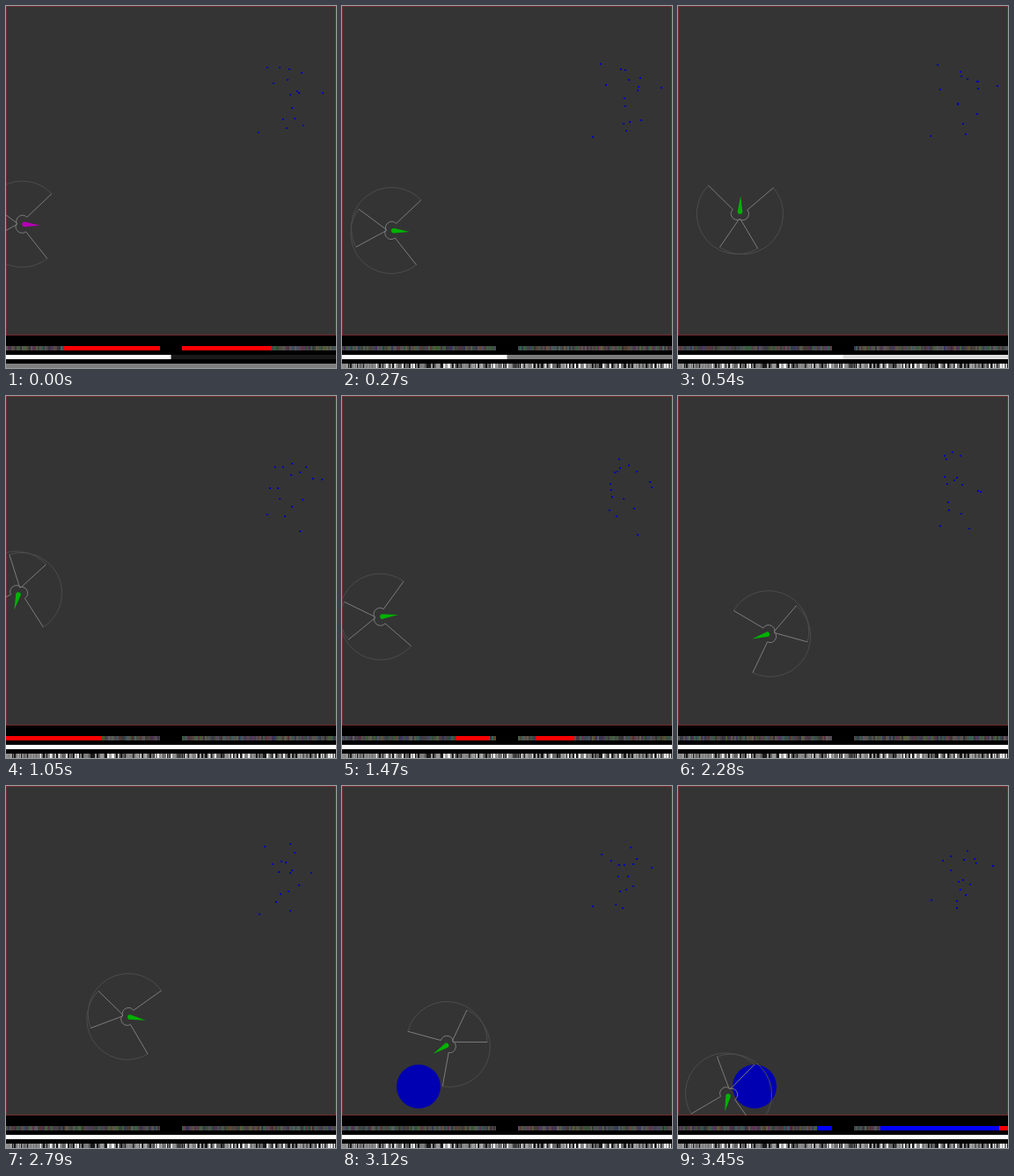
An HTML page with a canvas for the animation above (3.48 s loop, 375 by 412 pixels).

```html
<!DOCTYPE html>
<html>
<head>
<meta charset="utf-8">
<style>
html, body { margin: 0; width: 100%; height: 100%; overflow: hidden; background: #000; }
canvas { display: block; }
</style>
</head>
<body>
<canvas id="stage" width="375" height="412"></canvas>
<script>
const ctx = document.getElementById('stage').getContext('2d');
const LOOP = 3480, STEP = 30, WORLD = 375;
const RAD = Math.PI / 180, SPEED = 0.2;
const EYE = { offset: 4, turn: 130 * RAD, half: 82.5 * RAD, near: 7, far: 46, rays: 175 };
const FOOD = { x: 87, y: 342, r: 25, from: 3120 };
const SWARM = { count: 16, x: 318, y: 110, spreadX: 44, spreadY: 42, right: 364, top: 62 };
const BLUE = '#0000b2', BLUE_SEEN = '#0000ff', RED = '#ff0000';

// Agent waypoints: time, x, y, heading in degrees
const route = [
  [0, 21, 248.5, 4], [540, 70.5, 234, -88], [1050, 14, 226, 105],
  [1890, 57.5, 263.5, 138], [2280, 101.3, 271.3, 163],
  [2790, 141, 263, 12], [3450, 57, 353, 102]
];

function random(seed) {
  let s = seed | 0;
  return () => {
    s = (s + 0x6D2B79F5) | 0;
    let n = Math.imul(s ^ (s >>> 15), 1 | s);
    n ^= n + Math.imul(n ^ (n >>> 7), 61 | n);
    return ((n ^ (n >>> 14)) >>> 0) / 4294967296;
  };
}

const clamp = (v, lo, hi) => Math.max(lo, Math.min(hi, v));
const grey = v => `rgb(${v | 0},${v | 0},${v | 0})`;

// The agent always drives along its heading
function agentAt(t) {
  const next = route.findIndex((p, i) => i && t <= p[0]);
  const a = route[next - 1], b = route[next];
  const span = b[0] - a[0], u = (t - a[0]) / span;
  const axis = (i, fn) => {
    const p = a[i], q = b[i];
    const m = SPEED * span * fn(a[3] * RAD), n = SPEED * span * fn(b[3] * RAD);
    const c = 3 * (q - p) - 2 * m - n, d = 2 * (p - q) + m + n;
    return [p + u * (m + u * (c + u * d)), m + u * (2 * c + 3 * u * d)];
  };
  const [x, vx] = axis(1, Math.cos), [y, vy] = axis(2, Math.sin);
  return { x: clamp(x, 5, WORLD - 5), y: clamp(y, 5, WORLD - 5), heading: Math.atan2(vy, vx) };
}

function eyeOf(agent, side) {
  const dir = agent.heading + side * EYE.turn;
  return {
    x: agent.x + EYE.offset * Math.cos(dir),
    y: agent.y + EYE.offset * Math.sin(dir),
    from: dir - EYE.half, to: dir + EYE.half
  };
}

function drawEye(eye) {
  const arc = (r, color) => {
    ctx.strokeStyle = color;
    ctx.beginPath();
    ctx.arc(eye.x, eye.y, r, eye.from, eye.to);
    ctx.stroke();
  };
  arc(EYE.far, '#4c4c4c');
  arc(EYE.near, '#7c7c7c');
  ctx.beginPath();
  for (const angle of [eye.from, eye.to]) {
    const c = Math.cos(angle), s = Math.sin(angle);
    ctx.moveTo(eye.x + EYE.near * c, eye.y + EYE.near * s);
    ctx.lineTo(eye.x + EYE.far * c, eye.y + EYE.far * s);
  }
  ctx.stroke();
}

function drawBody(agent, color) {
  ctx.save();
  ctx.translate(agent.x, agent.y);
  ctx.rotate(agent.heading);
  ctx.fillStyle = color;
  ctx.beginPath();
  ctx.arc(0, 0, 2.8, 75 * RAD, 285 * RAD);
  ctx.lineTo(18, 0);
  ctx.fill();
  ctx.restore();
}

// Colour hit by a ray, or null when nothing is in range
function look(eye, angle, foodVisible) {
  const c = Math.cos(angle), s = Math.sin(angle);
  const wall = Math.min(
    c > 0 ? (WORLD - eye.x) / c : -eye.x / c,
    s > 0 ? (WORLD - eye.y) / s : -eye.y / s);
  let food = Infinity;
  if (foodVisible) {
    const dx = FOOD.x - eye.x, dy = FOOD.y - eye.y;
    const along = dx * c + dy * s;
    const root = FOOD.r ** 2 - (dx * dx + dy * dy - along * along);
    if (root >= 0 && along > 0) food = along - Math.sqrt(root);
  }
  if (Math.min(wall, food) > EYE.far) return null;
  return food < wall ? BLUE_SEEN : RED;
}

function drawRetina(eye, left, foodVisible, rnd) {
  const noise = () => 48 + rnd() * 50 | 0;
  let blank;
  for (let i = 0; i < EYE.rays; i++) {
    const angle = eye.from + (eye.to - eye.from) * i / EYE.rays;
    if (i % 2 === 0) blank = `rgb(${noise()},${noise()},${noise()})`;
    ctx.fillStyle = look(eye, angle, foodVisible) || blank;
    ctx.fillRect(left + i, 387, 1, 5);
  }
}

function drawMotors(t) {
  ctx.fillStyle = grey(255 * clamp(0.1 + t / 700, 0, 1));
  ctx.fillRect(0, 397, WORLD, 5);
  ctx.fillStyle = '#fff';
  ctx.fillRect(0, 397, WORLD / 2, 5);
}

// Cells settle from even grey into a fixed pattern of mid greys with a few extremes
function drawNeurons(t) {
  const rnd = random(11), gain = Math.min(1, t / 240);
  for (let x = 0; x < WORLD;) {
    const width = rnd() < 0.5 ? 1 : 2, kind = rnd();
    const value = kind < 0.22 ? 0.1 : kind > 0.86 ? 0.95 : 0.35 + rnd() * 0.35;
    ctx.fillStyle = grey(255 * (0.5 + (value - 0.5) * gain));
    ctx.fillRect(x, 407, width, 5);
    x += width;
  }
}

// Each dot drifts slowly around its own place in the cluster
function drawSwarm(t) {
  const rnd = random(5);
  const drift = () => 10 * Math.sin(t / (300 + 500 * rnd()) + 2 * Math.PI * rnd());
  ctx.fillStyle = BLUE;
  for (let i = 0; i < SWARM.count; i++) {
    const angle = 2 * Math.PI * rnd(), r = Math.sqrt(rnd());
    const x = SWARM.x + SWARM.spreadX * r * Math.cos(angle) + drift();
    const y = SWARM.y + SWARM.spreadY * r * Math.sin(angle) + drift();
    ctx.fillRect(Math.round(Math.min(x, SWARM.right)) - 1,
      Math.round(Math.max(y, SWARM.top)) - 1, 2, 2);
  }
}

function draw(t) {
  const agent = agentAt(t), foodVisible = t >= FOOD.from;
  const eyes = [eyeOf(agent, 1), eyeOf(agent, -1)];
  const rnd = random(1000 + t);

  ctx.fillStyle = '#343434';
  ctx.fillRect(0, 0, WORLD, WORLD);
  ctx.lineWidth = 1;
  ctx.strokeStyle = '#742c2c';
  ctx.strokeRect(0.5, 0.5, WORLD - 1, WORLD - 1);

  drawSwarm(t);
  if (foodVisible) {
    ctx.fillStyle = BLUE;
    ctx.beginPath();
    ctx.arc(FOOD.x, FOOD.y, FOOD.r, 0, 2 * Math.PI);
    ctx.fill();
  }
  eyes.forEach(drawEye);
  drawBody(agent, t < 60 ? '#b400b4' : '#00b200');

  ctx.fillStyle = '#000';
  ctx.fillRect(0, WORLD, WORLD, 412 - WORLD);
  drawRetina(eyes[0], 0, foodVisible, rnd);
  drawRetina(eyes[1], 200, foodVisible, rnd);
  drawMotors(t);
  drawNeurons(t);
}

const start = performance.now();
function tick() {
  const t = (performance.now() - start) % LOOP;
  draw(Math.floor(t / STEP) * STEP);
  requestAnimationFrame(tick);
}
tick();
</script>
</body>
</html>
```
